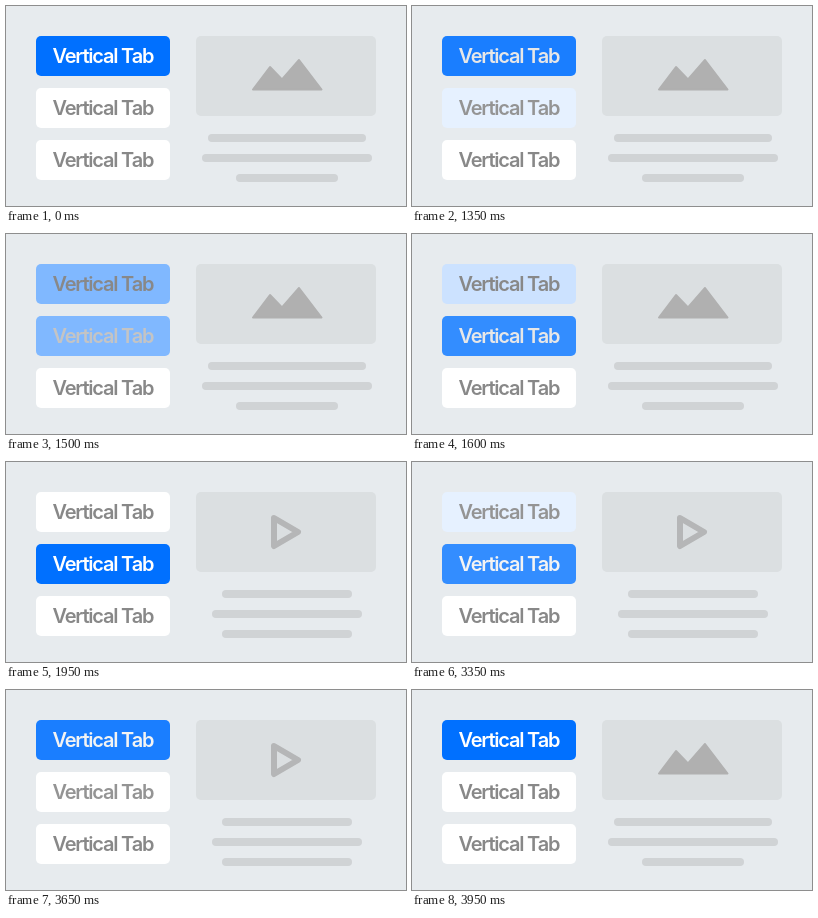
An HTML page with a canvas that plays this animation: 400 px wide and 200 px high, repeating every 4000 ms.

```html
<!DOCTYPE html>
<html lang="en">
<head>
<meta charset="utf-8">
<title>Vertical tabs</title>
<style>
  html, body { margin: 0; width: 100%; height: 100%; overflow: hidden; background: #e7ebee; }
  canvas { display: block; width: 400px; height: 200px; }
</style>
</head>
<body>
<canvas id="stage"></canvas>
<script>
const W = 400, H = 200, LOOP = 4000, HALF = 2000;
const FADE_START = 1320, STEP = 40, CLEAR = 1830, SHOW = 1930;
const WHITE = [255, 255, 255], BLUE = [0, 112, 255], GRAY = [136, 136, 136];

const canvas = document.getElementById('stage');
const ctx = canvas.getContext('2d');
const dpr = window.devicePixelRatio || 1;
canvas.width = W * dpr;
canvas.height = H * dpr;
ctx.scale(dpr, dpr);

const clamp = v => Math.min(1, Math.max(0, v));
const mix = (a, b, k) => `rgb(${a.map((v, i) => Math.round(v + (b[i] - v) * k))})`;

function box(x, y, w, h, r, fill) {
  ctx.fillStyle = fill;
  ctx.beginPath();
  ctx.roundRect(x, y, w, h, r);
  ctx.fill();
}

function tab(y, bgOn, textOn) {
  box(30, y, 134, 40, 5, mix(WHITE, BLUE, bgOn));
  ctx.fillStyle = mix(GRAY, WHITE, textOn);
  ctx.fillText('Vertical Tab', 46.5, y + 27);
}

function polygon(points) {
  ctx.beginPath();
  points.forEach(([x, y]) => ctx.lineTo(x, y));
  ctx.closePath();
}

function mountains() {
  ctx.fillStyle = ctx.strokeStyle = '#b0b0b0';
  ctx.lineWidth = 2;
  polygon([[247, 83.5], [264, 61], [276, 73.5], [293, 54], [315.5, 83.5]]);
  ctx.fill();
  ctx.stroke();
}

function play() {
  ctx.strokeStyle = '#b5b6b7';
  ctx.lineWidth = 6;
  polygon([[268, 56], [292, 70], [268, 84]]);
  ctx.stroke();
}

const panes = [
  { icon: mountains, lines: [[202, 158], [196, 170], [230, 102]] },
  { icon: play, lines: [[216, 130], [206, 150], [216, 130]] }
];

function draw(time) {
  const t = time % LOOP;
  const from = t < HALF ? 0 : 1;
  const local = t % HALF;
  const steps = Math.max(0, Math.floor((local - FADE_START) / STEP) + 1);
  const slow = clamp(steps / 10), fast = clamp(steps / 5);

  ctx.fillStyle = '#e7ebee';
  ctx.fillRect(0, 0, W, H);

  ctx.font = '600 20px Inter, "Liberation Sans", sans-serif';
  ctx.letterSpacing = '-1.2px';
  if (from === 0) {
    tab(30, 1 - slow, 1 - fast);
    tab(82, slow, slow);
  } else {
    tab(30, slow, slow);
    tab(82, 1 - fast, 1 - slow);
  }
  tab(134, 0, 0);

  box(190, 30, 180, 80, 5, '#dbdfe1');
  if (local < CLEAR || local >= SHOW) {
    const pane = panes[local < CLEAR ? from : 1 - from];
    ctx.lineJoin = 'round';
    pane.icon();
    pane.lines.forEach(([x, w], i) => box(x, 128 + i * 20, w, 8, 4, '#d0d3d5'));
  }
}

const start = performance.now();
function tick() {
  draw(performance.now() - start);
  requestAnimationFrame(tick);
}
tick();
</script>
</body>
</html>
```
